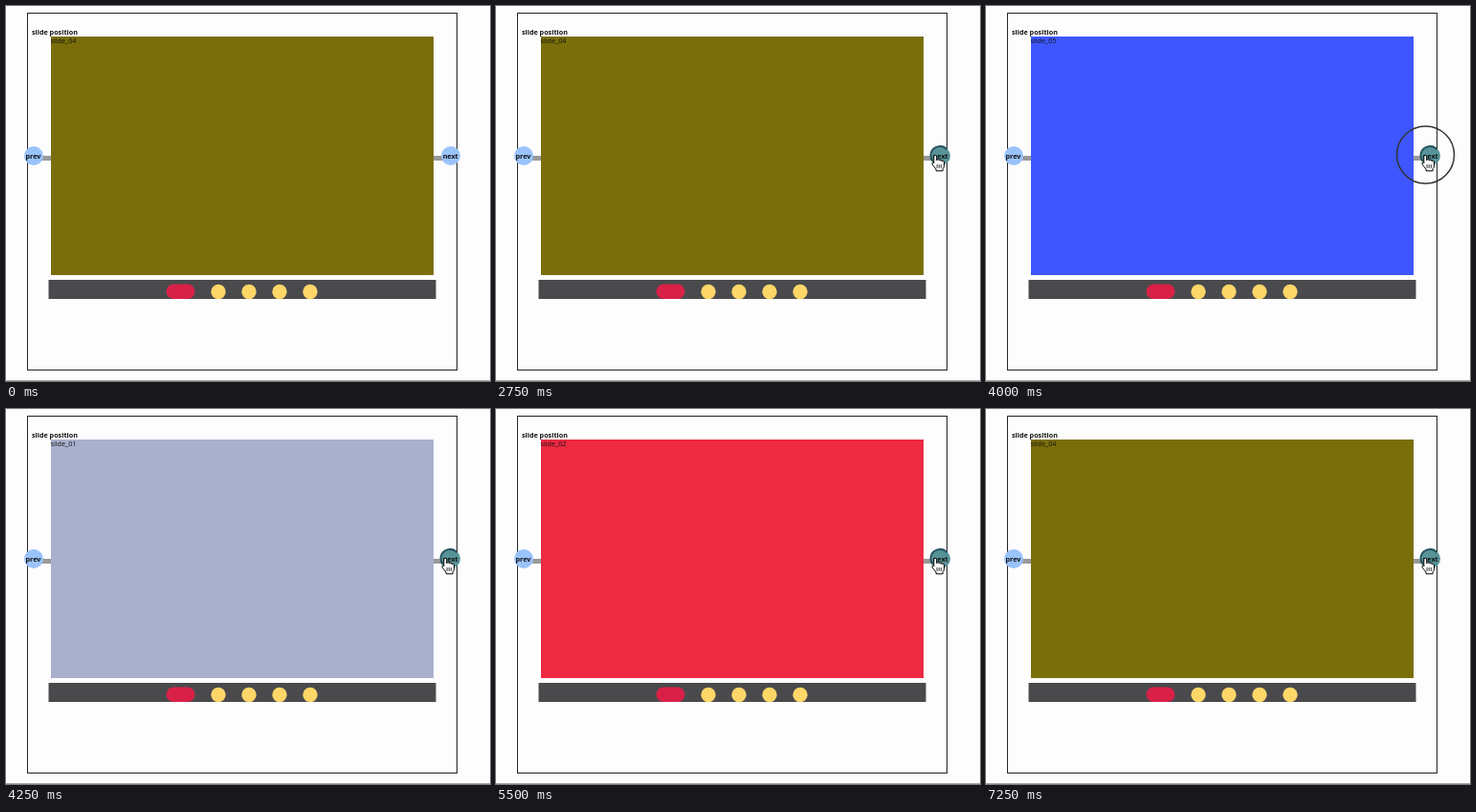
An HTML page that plays this animation: 506x393 px, repeating every 8000 ms.

```html
<!DOCTYPE html>
<html lang="en">
<head>
<meta charset="utf-8">
<title>Slide position</title>
<style>
  html, body { margin: 0; width: 100%; height: 100%; overflow: hidden; background: #fefdfe; }
  svg { display: block; }
  text { font: 7.2px "Open Sans", "Noto Sans", sans-serif; fill: #111; }
  .bold { font-weight: 700; }
  .label { font-weight: 700; text-anchor: middle; }
</style>
</head>
<body>
<svg width="506" height="393" viewBox="0 0 506 393">
  <path d="M0 392.5H506" stroke="#aaa"/>
  <rect x="22.5" y="7.5" width="449" height="374" fill="none" stroke="#222"/>
  <path d="M30 159.5H464" stroke="#999" stroke-width="5"/>
  <rect id="slide" x="47" y="32" width="400" height="250"/>
  <text class="bold" x="27" y="29.5">slide position</text>
  <text id="name" x="46.5" y="39"></text>

  <rect x="44.5" y="287" width="405" height="20" fill="#4a4a4d"/>
  <rect x="167.5" y="291.5" width="30" height="15.5" rx="7.75" fill="#d92148"/>
  <g id="dots" fill="#ffd768"></g>

  <circle cx="29" cy="157" r="10" fill="#9ac3fb"/>
  <text class="label" x="28.5" y="159.8">prev</text>
  <circle id="next" cx="465" cy="157" r="10"/>
  <path id="shade" d="M456.8 163A9.3 9.3 0 0 1 471.5 150.4" fill="none" stroke="#24545f" stroke-width="2"/>
  <text class="label" x="464.7" y="159.8">next</text>

  <circle id="ring" cx="459.5" cy="156" r="30" fill="none" stroke="#333" stroke-width="1.5"/>
  <g id="hand" stroke="#000" stroke-linejoin="round" stroke-linecap="round">
    <path fill="#fff" d="M-1.7 8.2V1.8Q-1.7 .3 -.3 .3T1.2 1.8V5.7Q1.5 4.6 2.7 4.7T4 6Q4.4 5.1 5.5 5.3T6.7 6.8Q7.2 6 8.2 6.3T9 8V11.4Q9 13.4 7.6 14.6V16.8H.6V15L-3.3 10.2Q-4 8.8 -3 8.1T-1.7 8.2Z"/>
    <path fill="none" stroke-width=".8" d="M1.6 10.5V13.5M3.7 10.5V13.5M5.8 10.5V13.5"/>
  </g>
</svg>
<script>
const LOOP = 8000, STEP = 250;
const $ = id => document.getElementById(id);

// [start, number, colour]
const slides = [
  [0, 4, "#796e09"], [3250, 5, "#3d56ff"], [4250, 1, "#a9b0cd"],
  [5500, 2, "#ee2942"], [6250, 3, "#eca995"], [7250, 4, "#796e09"]
];
// [start, x, y] of the pointer's fingertip
const pointer = [
  [1750, 466, 152], [2000, 454, 143], [2250, 461, 149], [2500, 466, 154], [2750, 459.5, 156]
];
const clicks = [3000, 4000, 5000, 6000, 7000];

const latest = (list, t) => list.filter(([start]) => start <= t).pop();
const show = (id, on) => $(id).setAttribute("visibility", on ? "visible" : "hidden");

for (let x = 222; x <= 318; x += 32)
  $("dots").innerHTML += `<circle cx="${x}" cy="299.5" r="7.7"/>`;

function draw(now) {
  const t = Math.floor(now % LOOP / STEP) * STEP;
  const [, number, colour] = latest(slides, t);
  $("slide").setAttribute("fill", colour);
  $("name").textContent = "slide_0" + number;

  const pos = latest(pointer, t);
  if (pos) $("hand").setAttribute("transform", `translate(${pos[1]} ${pos[2]})`);
  show("hand", pos);
  show("shade", pos);
  $("next").setAttribute("fill", pos ? "#579398" : "#9ac3fb");
  show("ring", clicks.includes(t));
  requestAnimationFrame(draw);
}
draw(0);
</script>
</body>
</html>
```
